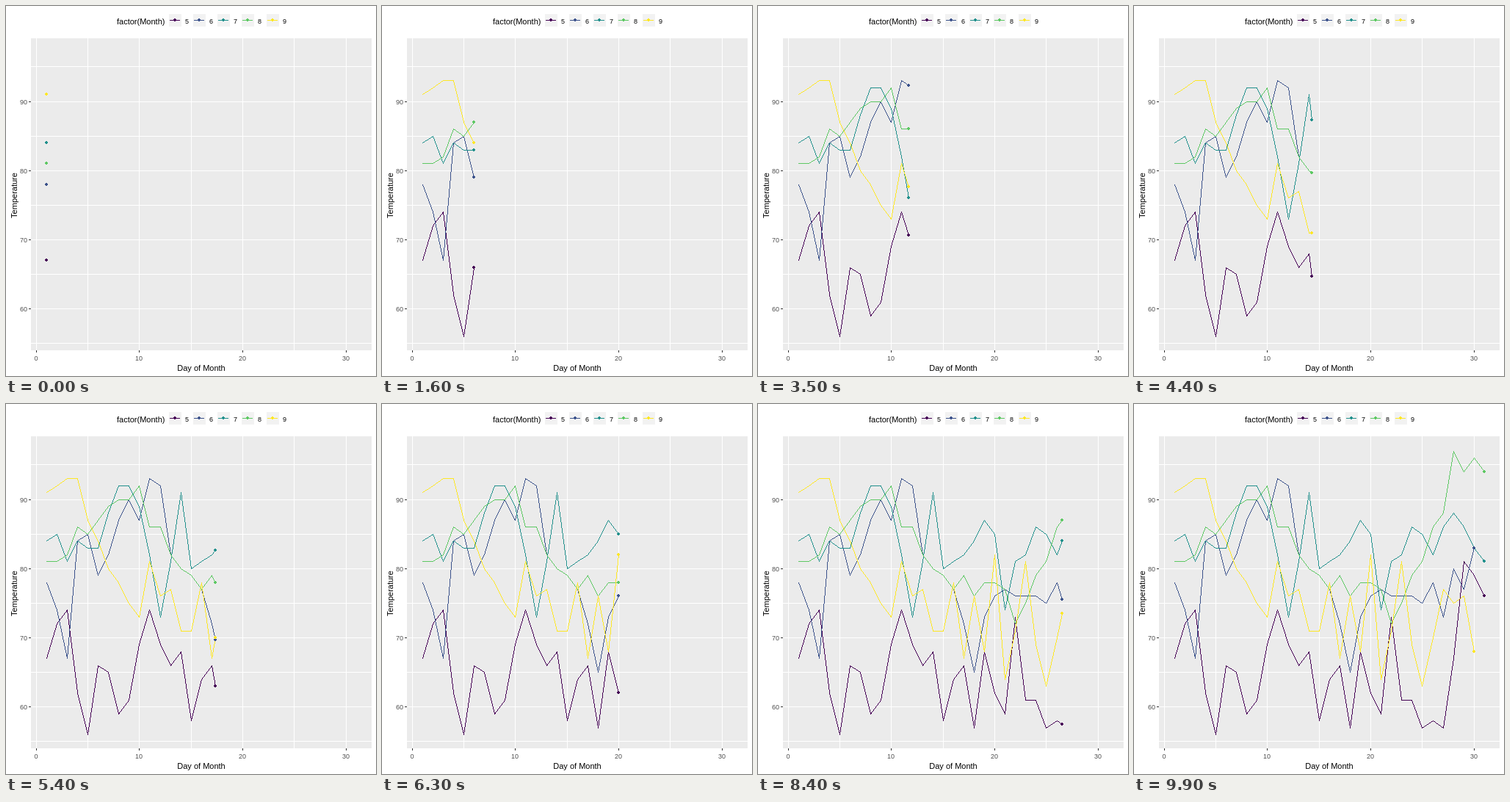
Animation of 504x504 px, one loop 10000 ms. Source, as an HTML page with a canvas:

```html
<!DOCTYPE html>
<html lang="en">
<head>
<meta charset="utf-8">
<title>Temperature by day</title>
<style>
html, body { margin: 0; width: 100%; height: 100%; overflow: hidden; background: #fff; }
canvas { display: block; width: 504px; height: 504px; }
</style>
</head>
<body>
<canvas id="chart" width="504" height="504"></canvas>
<script>
const ctx = document.getElementById('chart').getContext('2d');
const STEPS = 100, STEP_MS = 100, LAST_DAY = 31;
const FONT = '"Liberation Sans", Arial, sans-serif';

// Daily temperatures per month; "=" repeats the day before.
const months = [
  ['5', '#440154', '67 72 74 62 56 66 65 59 61 69 74 69 66 68 58 64 66 57 68 62 59 73 61 = 57 58 57 67 81 79 76'],
  ['6', '#3B528B', '78 74 67 84 85 79 82 87 90 87 93 92 82 80 79 77 72 65 73 76 77 76 = = 75 78 73 80 77 83'],
  ['7', '#21908C', '84 85 81 84 83 = 88 92 = 89 82 73 81 91 80 81 82 84 87 85 74 81 82 86 85 82 86 88 86 83 81'],
  ['8', '#5DC863', '81 = 82 86 85 87 89 90 = 92 86 = 82 80 79 77 79 76 78 = 77 72 75 79 81 86 88 97 94 96 94'],
  ['9', '#FDE725', '91 92 93 = 87 84 80 78 75 73 81 76 77 71 = 78 67 76 68 82 64 71 81 69 63 70 77 75 76 68']
].map(([name, color, text]) => {
  let prev;
  const temps = text.split(' ').map(s => prev = s === '=' ? prev : +s);
  return { name, color, temps };
});

const px = day => Math.floor(34.1 + (day + 0.5) * 14.073);
const py = temp => Math.floor(44.75 + (99.05 - temp) * 9.425);

// Round half to even.
function roundEven(v) {
  const n = Math.floor(v), rest = v - n;
  return rest === 0.5 ? n + n % 2 : Math.round(v);
}

const stepOf = day => roundEven((STEPS - 1) * (day - 1) / (LAST_DAY - 1));

function rect(x, y, w, h, color) {
  ctx.fillStyle = color;
  ctx.fillRect(x, y, w, h);
}

function label(text, x, y, size, color, align) {
  ctx.font = size + 'px ' + FONT;
  ctx.fillStyle = color;
  ctx.textAlign = align;
  ctx.fillText(text, x, y);
}

// One-pixel line without smoothing.
function line(x0, y0, x1, y1) {
  const dx = Math.abs(x1 - x0), dy = Math.abs(y1 - y0);
  const sx = Math.sign(x1 - x0), sy = Math.sign(y1 - y0);
  let err = dx - dy;
  for (;;) {
    ctx.fillRect(x0, y0, 1, 1);
    if (x0 === x1 && y0 === y1) return;
    const e = 2 * err;
    if (e > -dy) { err -= dy; x0 += sx; }
    if (e < dx) { err += dx; y0 += sy; }
  }
}

function dot(x, y) {
  ctx.fillRect(x - 1, y - 2, 2, 4);
  ctx.fillRect(x - 2, y - 1, 4, 2);
}

function drawPanel() {
  rect(0, 0, 504, 504, '#fff');
  rect(34, 44, 464, 425, '#EBEBEB');
  for (let t = 55; t <= 95; t += 5) rect(34, py(t), 464, 1, '#fff');
  for (let d = 0; d <= 30; d += 5) rect(px(d), 44, 1, 425, '#fff');

  for (let t = 60; t <= 90; t += 10) {
    rect(31, py(t), 3, 1, '#333');
    label(t, 29, py(t) + 4, 9, '#4D4D4D', 'right');
  }
  for (let d = 0; d <= 30; d += 10) {
    rect(px(d), 469, 1, 3, '#333');
    label(d, px(d), 483, 9, '#4D4D4D', 'center');
  }

  label('Day of Month', 266, 497, 11, '#000', 'center');
  ctx.save();
  ctx.translate(15, 258);
  ctx.rotate(-Math.PI / 2);
  label('Temperature', 0, 0, 11, '#000', 'center');
  ctx.restore();
}

function drawLegend() {
  label('factor(Month)', 151, 25, 11, '#000', 'left');
  months.forEach((m, i) => {
    const x = Math.floor(222.1 + 33.28 * i);
    rect(x, 11, 17, 17, '#F2F2F2');
    rect(x + 1, 19, 14, 1, m.color);
    dot(x + 8, 19);
    label(m.name, x + 22, 24, 9, '#000', 'left');
  });
}

// Day reached by a series of the given length at this step.
function dayAt(step, count) {
  let d = 1;
  while (d < count && stepOf(d + 1) <= step) d++;
  if (d === count) return d;
  const from = stepOf(d);
  return d + (step - from) / (stepOf(d + 1) - from);
}

function drawSeries(step) {
  const heads = months.map(({ color, temps }) => {
    const day = dayAt(step, temps.length);
    const whole = Math.floor(day);
    const points = temps.slice(0, whole).map((t, i) => [px(i + 1), py(t)]);
    if (day > whole) {
      const a = temps[whole - 1], b = temps[whole];
      points.push([px(day), py(a + (b - a) * (day - whole))]);
    }
    ctx.fillStyle = color;
    for (let i = 1; i < points.length; i++) line(...points[i - 1], ...points[i]);
    return points[points.length - 1];
  });
  heads.forEach(([x, y], i) => {
    ctx.fillStyle = months[i].color;
    dot(x, y);
  });
}

const start = performance.now();
let shown = -1;

function tick() {
  const step = Math.floor((performance.now() - start) / STEP_MS) % STEPS;
  if (step !== shown) {
    shown = step;
    drawPanel();
    drawLegend();
    drawSeries(step);
  }
  requestAnimationFrame(tick);
}
tick();
</script>
</body>
</html>
```
